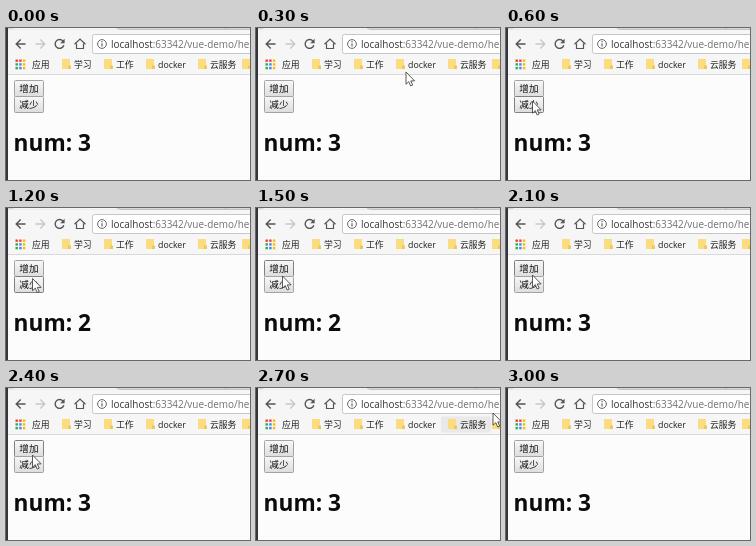
An HTML page that plays this animation: 244x152 px, repeating every 3.15 s.

```html
<!DOCTYPE html>
<html lang="zh">
<head>
<meta charset="utf-8">
<title>Counter demo</title>
<style>
html, body { margin: 0; width: 100%; height: 100%; overflow: hidden; background: #fcfcfc; }
svg { display: block; width: 244px; height: 152px; }
text { font-family: "Open Sans", "Noto Sans CJK SC", "Noto Sans CJK", sans-serif; white-space: pre; }
.mark { font-size: 8.8px; fill: #222; }
.btn { font-size: 9.6px; fill: #111; }
.url { font-size: 9.95px; fill: #707070; }
.num { font-size: 22.7px; font-weight: 700; fill: #0c0c0c; }
</style>
</head>
<body>
<svg viewBox="0 0 244 152" xmlns="http://www.w3.org/2000/svg">
  <defs>
    <linearGradient id="face" x2="0" y2="1">
      <stop stop-color="#f8f8f8"/><stop offset="1" stop-color="#dddddd"/>
    </linearGradient>
    <g id="folder">
      <path d="M0 0H8V10H0z" fill="#fbdd80"/>
      <path d="M6 6.5H9V10H6z" fill="#f0c75c"/>
    </g>
  </defs>

  <rect width="244" height="152" fill="#fcfcfc"/>
  <rect width="244" height="46" fill="#f6f6f6"/>
  <rect width="244" height="1.5" fill="#d8d8d8"/>
  <path d="M8 0H111L114 1.5H6z" fill="#f6f6f6"/>
  <path d="M111 0L114 1.5H244M219 0l2 1.5" fill="none" stroke="#b5b5b5" stroke-width=".7"/>

  <g fill="none" stroke-width="1.4">
    <path d="M19.5 16H10.5M14.7 11.5L10.2 16l4.5 4.5" stroke="#555"/>
    <path d="M29.5 16H38.5M34.3 11.5L38.8 16l-4.5 4.5" stroke="#c8c8c8"/>
    <path d="M57 13.2A4.4 4.4 0 1 0 57.8 17.2" stroke="#555"/>
    <path d="M68.5 16.2L74 11l5.5 5.2M70.5 15.5V20.5H77.5V15.5" stroke="#555" stroke-width="1.2"/>
  </g>
  <path d="M58.6 10.8V15.2H54.2z" fill="#555"/>

  <rect x="86.5" y="6.5" width="170" height="19" rx="2" fill="#fff" stroke="#c6c6c6"/>
  <circle cx="96" cy="16" r="4.4" fill="none" stroke="#666"/>
  <path d="M96 15.2V18.5M96 13V14.2" stroke="#666" stroke-width="1.2"/>
  <text class="url" x="105" y="19.6"><tspan fill="#333">localhost</tspan>:63342/vue-demo/he</text>

  <rect id="hover" x="185" y="28.5" width="50" height="16" rx="1.5" fill="#e9e9e9"/>
  <g id="apps"></g>
  <g id="marks"></g>
  <path d="M0 46.5H244" stroke="#d9d9d9"/>

  <g id="buttons"></g>
  <text class="num" id="num" x="7.6" y="123.2"></text>
  <rect width="2" height="152" fill="#33363b"/>

  <path id="cursor" d="M0 0V12.2L2.8 9.6 4.7 14 6.7 13.1 4.8 8.9H8.6z" fill="#fff" stroke="#333" stroke-width=".8"/>
</svg>
<script>
const LOOP = 3150;
const NS = "http://www.w3.org/2000/svg";
const $ = id => document.getElementById(id);

function add(parent, tag, attrs, label) {
  const el = document.createElementNS(NS, tag);
  for (const key in attrs) el.setAttribute(key, attrs[key]);
  if (label) el.textContent = label;
  return parent.appendChild(el);
}

const dots = ["#ea4335", "#ea4335", "#fbbc05", "#34a853", "#4285f4", "#fbbc05", "#34a853", "#4285f4", "#fbbc05"];
dots.forEach((fill, i) => add($("apps"), "rect", {
  x: 9.5 + (i % 3) * 3.7, y: 31.5 + Math.floor(i / 3) * 3.7, width: 2.4, height: 2.4, fill
}));

add($("marks"), "text", { class: "mark", x: 26, y: 39.5 }, "应用");
[[68, "学习"], [110, "工作"], [152, "docker"], [204, "云服务"], [248, ""]].forEach(([x, label]) => {
  add($("marks"), "use", { href: "#folder", x: x - 12, y: 31 });
  if (label) add($("marks"), "text", { class: "mark", x, y: 39.5 }, label);
});

const buttons = [["增加", 53], ["减少", 69]].map(([label, y]) => {
  const box = add($("buttons"), "rect", {
    x: 8.5, y: y - .5, width: 29, height: 16, rx: 1, fill: "url(#face)"
  });
  add($("buttons"), "text", { class: "btn", x: 13.3, y: y + 11.4 }, label);
  return box;
});

// Pointer samples: start time, x, y; it is hidden outside them.
const path = [
  [300, 150, 44], [450, 45, 69], [600, 26.5, 73], [1200, 26.5, 70.5],
  [1350, 26.5, 69], [1500, 26.5, 68], [1800, 26.5, 67],
  [2550, 200, 40], [2700, 237, 25]
];
const LEAVE = 2850;

function draw(t) {
  const shown = t >= path[0][0] && t < LEAVE;
  const [, x, y] = path.filter(p => p[0] <= t).pop() || path[0];
  const onButton = shown && x < 38;
  $("cursor").setAttribute("visibility", shown ? "visible" : "hidden");
  $("cursor").setAttribute("transform", `translate(${x} ${y})`);
  $("hover").setAttribute("visibility", shown && x > 184 && y < 46 ? "visible" : "hidden");
  buttons.forEach((box, i) => {
    const over = onButton && (y >= 69 ? 1 : 0) === i;
    box.setAttribute("stroke", over ? "#808080" : "#a3a3a3");
  });
  $("num").textContent = "num: " + (t >= 750 && t < 1950 ? 2 : 3);
}

const start = performance.now();
function tick() {
  draw((performance.now() - start) % LOOP);
  requestAnimationFrame(tick);
}
tick();
</script>
</body>
</html>
```
